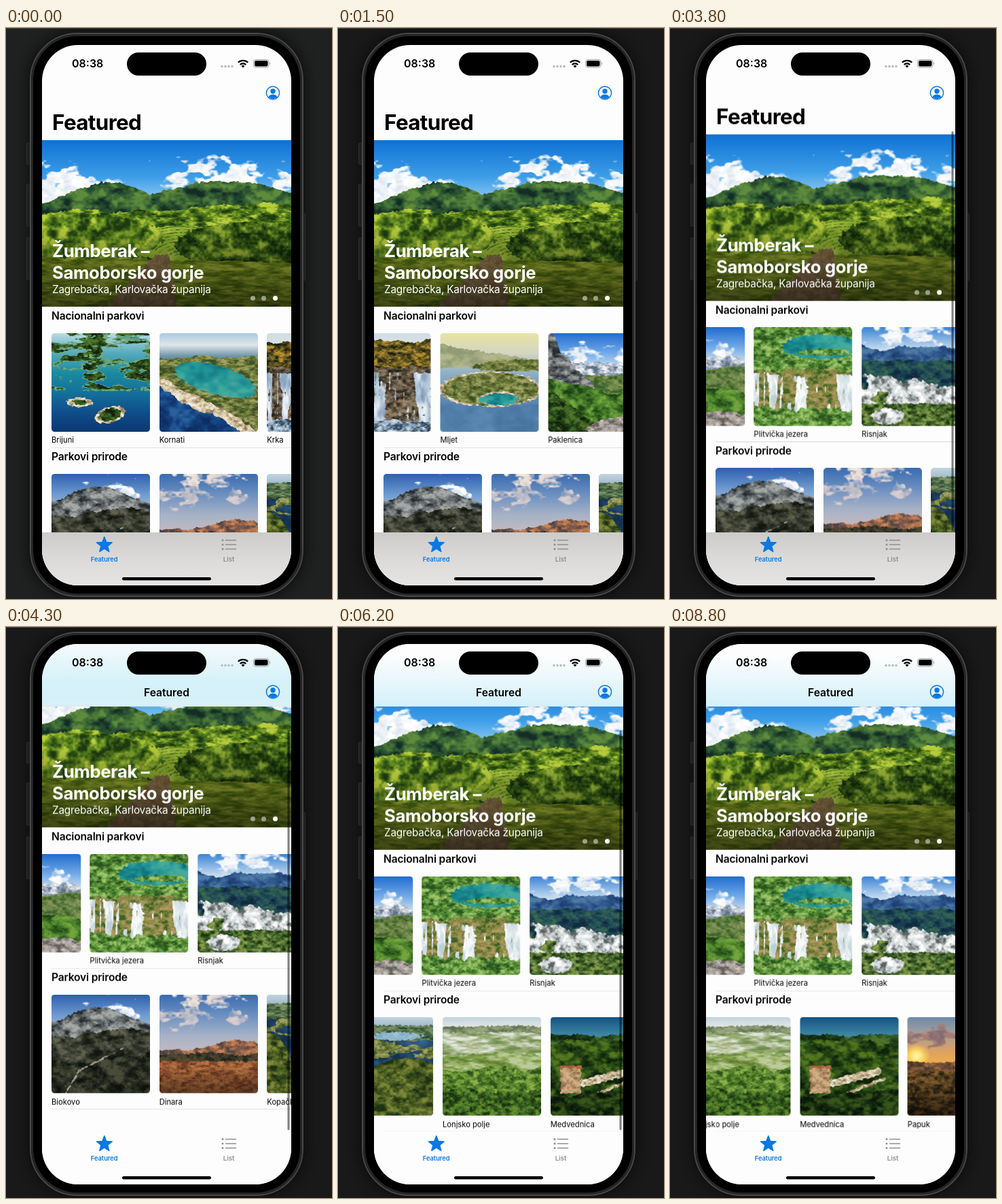
An HTML page with a canvas for the animation above (9.3 s loop, 480x840 px).

```html
<!DOCTYPE html>
<html lang="hr">
<head>
<meta charset="utf-8">
<title>Parkovi</title>
<style>
  html, body { margin: 0; width: 100%; height: 100%; overflow: hidden; background: #191919; }
  #stage { position: relative; width: 480px; height: 840px; overflow: hidden; font-family: Inter, sans-serif; color: #000; }
  #stage * { box-sizing: border-box; }
  #stage div, canvas, svg { position: absolute; }
  canvas { left: 0; top: 0; }
  .edge { left: 0; top: 0; width: 480px; height: 1px; background: #4b483d; }
  .button { left: 30px; width: 6px; height: 63px; background: #303030; border: 1px solid #414141; border-radius: 2px; }
  .phone { left: 35px; top: 7px; width: 403px; height: 830px; border-radius: 70px; background: #000;
    border: 2px solid #484848; box-shadow: inset 0 0 0 3px #252525, 0 0 20px #0a0a0a; }
  .screen { left: 53px; top: 25px; width: 367px; height: 795px; border-radius: 53px; overflow: hidden; background: #fdfdfd; }
  #page { inset: 0; }
  #page div { white-space: nowrap; }
  #large { left: 15px; top: 93.5px; font: 700 31.4px/40px Inter, sans-serif; letter-spacing: -.02em; }
  #hero { left: 0; top: 139.5px; width: 367px; height: 244.5px; color: #fff; }
  .name { left: 15px; top: 147.5px; font: 700 25.7px/32px Inter, sans-serif; letter-spacing: -.014em; }
  .county { left: 15px; top: 210.5px; font: 400 15.4px/20px Inter, sans-serif; letter-spacing: -.016em; }
  .dot { top: 229px; width: 7.4px; height: 7.4px; border-radius: 50%; background: #fff; }
  .section { left: 0; width: 367px; height: 208px; }
  .heading { left: 14px; top: 0; font: 600 15.6px/20px Inter, sans-serif; letter-spacing: -.012em; }
  .row { left: 14px; top: 35px; }
  .row canvas { border-radius: 4.5px; }
  .label { top: 149.5px; font: 400 11.2px/16px Inter, sans-serif; }
  .rule { left: 14px; right: 0; top: 203px; height: 1px; background: #e2e2e3; }
  #nav { left: 0; top: 0; width: 367px; height: 91.5px; overflow: hidden; border-bottom: 1px solid #0000001a; background: #fdfdfd; }
  #haze { left: 0; top: 100px; width: 367px; height: 160px; background: linear-gradient(#fdfdfd, #d5f1fa 45%, #deeff2); }
  .tabs { left: 0; top: 717px; width: 367px; height: 78px; background: #fdfdfd; }
  #frost { inset: 0; background: linear-gradient(#cccbca, #dcdad8 50%, #e5e4e2); }
  svg { left: 0; top: 0; }
  svg text { font-family: Inter, sans-serif; font-weight: 600; }
</style>
</head>
<body>
<div id="stage">
  <div class="edge"></div>
  <div class="button" style="top:169px;height:32px"></div>
  <div class="button" style="top:229px"></div>
  <div class="button" style="top:308px"></div>
  <div class="button" style="left:435px;top:272px;height:100px"></div>
  <div class="phone"></div>
  <div class="screen">
    <div id="page">
      <div id="large">Featured</div>
      <div id="hero">
        <div class="name">Žumberak –<br>Samoborsko gorje</div>
        <div class="county">Zagrebačka, Karlovačka županija</div>
        <div class="dot" style="left:307px;opacity:.5"></div>
        <div class="dot" style="left:323px;opacity:.5"></div>
        <div class="dot" style="left:340px"></div>
      </div>
    </div>
    <div id="nav"><div id="haze"></div></div>
    <div class="tabs"><div id="frost"></div></div>
  </div>
  <svg width="480" height="840">
    <rect x="178" y="36" width="117" height="34" rx="17"/>
    <text x="97" y="58" font-size="16">08:38</text>
    <path d="M318 56.5h17" stroke="#bbb" stroke-width="3.6" stroke-linecap="round" stroke-dasharray="0 5"/>
    <g fill="none" stroke="#000" stroke-width="2.3">
      <path d="M341.8 50.8a10.2 10.2 0 0 1 14.4 0M344.7 54a6.1 6.1 0 0 1 8.6 0"/>
      <path d="M349 58.6l-2.5-2.7a3.6 3.6 0 0 1 5 0z" fill="#000" stroke="none"/>
    </g>
    <rect x="364.5" y="46.5" width="22.5" height="11.5" rx="3.5" fill="none" stroke="#999"/>
    <rect x="366" y="48" width="19.5" height="8.5" rx="2.2"/>
    <path d="M388.5 50.3q2 2 0 4z" fill="#999"/>
    <g fill="#0b78e3">
      <circle cx="393" cy="95.5" r="9.6" fill="none" stroke="#0b78e3" stroke-width="1.5"/>
      <circle cx="393" cy="93" r="3.7"/>
      <path d="M386.4 101.6q1.4-3.8 6.6-3.8t6.6 3.8q-2.8 2.6-6.6 2.6t-6.6-2.6z"/>
      <path id="star" stroke="#0b78e3" stroke-width="1.4" stroke-linejoin="round"/>
      <text x="144.7" y="784.5" font-size="9.3" text-anchor="middle">Featured</text>
    </g>
    <g fill="#8e8e90" stroke="#8e8e90">
      <path d="M323.5 753.5h15M323.5 760h15M323.5 766.5h15" stroke-width="1.5" stroke-linecap="round"/>
      <path d="M319 753.5h0M319 760h0M319 766.5h0" stroke-width="3" stroke-linecap="round"/>
      <text x="328" y="784.5" font-size="9.6" text-anchor="middle" stroke="none">List</text>
    </g>
    <rect x="171" y="808" width="131" height="4.6" rx="2.3"/>
    <text id="title" x="236.5" y="101.5" font-size="15.6" text-anchor="middle">Featured</text>
    <rect id="bar" x="414.5" y="152" width="3" height="588" rx="1.5" fill-opacity=".5"/>
  </svg>
</div>
<script>
const LOOP = 9300, STEP = 100, CARD = 145, PITCH = 158.67;
const $ = id => document.getElementById(id);
const clamp = v => Math.min(1, Math.max(0, v));

// seeded value noise
let seed = 4711;
const rand = () => (seed = seed * 16807 % 2147483647) / 2147483647;
const grid = Float32Array.from({ length: 65536 }, rand);
const cell = (i, j) => grid[(j & 255) << 8 | i & 255];
const mix = (a, b, t) => a + (b - a) * t;
const smooth = t => t * t * (3 - 2 * t);

function noise(x, y) {
  const i = Math.floor(x), j = Math.floor(y), u = smooth(x - i), v = smooth(y - j);
  return mix(mix(cell(i, j), cell(i + 1, j), u), mix(cell(i, j + 1), cell(i + 1, j + 1), u), v);
}
const fbm = (x, y) => .5 * noise(x, y) + .3 * noise(2.1 * x, 2.1 * y + 7) + .2 * noise(4.3 * x, 4.3 * y + 19);

// shapes: functions of (x, y), positive inside, roughly in pixels
const below = (top, slope = 0, amp = 5, wave = 30) => (x, y) => y - top - slope * x - amp * (2 * fbm(x / wave, top) - 1);
const hump = (cx, top, width, height) => (x, y) => y - top - height * (1 - Math.exp(-(((x - cx) / width) ** 2))) - 6 * fbm(x / 14, top) + 3;
const oval = (cx, cy, rx, ry, tilt = 0) => (x, y) =>
  (1 - Math.hypot((x - cx) / rx, (y - cy - tilt * (x - cx)) / ry)) * Math.min(rx, ry);
const box = (x0, y0, x1, y1) => (x, y) => Math.min(x - x0, x1 - x, y - y0, y1 - y);
const strip = (x0, y0, x1, y1, width) => (x, y) => {
  const dx = x1 - x0, dy = y1 - y0, t = clamp(((x - x0) * dx + (y - y0) * dy) / (dx * dx + dy * dy));
  return width / 2 - Math.hypot(x - x0 - t * dx, y - y0 - t * dy);
};
const both = (a, b) => (x, y) => Math.min(a(x, y), b(x, y));
const either = (a, b) => (x, y) => Math.max(a(x, y), b(x, y));
const grow = (a, d) => (x, y) => a(x, y) + d;
const above = bottom => (x, y) => bottom - y;
const band = (top, bottom, slope) => both(below(top, slope), above(bottom));
const patches = (cut, wide, high) => (x, y) => (fbm(x / wide, y / high) - cut) * 3 * high;
const streaks = area => both(area, (x, y) => (noise(x / 3, y / 30) + noise(x / 13, 3) - 1) * 14);
const rings = (cx, cy) => (x, y) => (Math.sin(Math.hypot(x - cx, 1.9 * (y - cy)) * .75) - .7) * 2;

const FOREST = ['#0f200c', '#2a4a1b', '#4f7629'];
const SPRING = ['#28531f', '#578f36', '#a0c56c'];
const SUNLIT = ['#1d3a11', '#567f1d', '#b9ce3c'];
const OLIVE = ['#3c4f22', '#6d7b3a', '#a6a468'];
const ROCK = ['#252b2e', '#626869', '#a5a8a6'];
const SCREE = ['#12160f', '#35392d', '#626251'];
const CHALK = ['#59645f', '#ced3d5', '#ffffff'];
const SAND = ['#8f7b5b', '#cdbb96', '#f2eada'];
const EARTH = ['#29231c', '#5f5240', '#98866a'];
const SEA = ['#0c2d62', '#14427f', '#2a609f'];
const LAKE = ['#10717a', '#1f9296', '#45aa9c'];

function paint(w, h, scene) {
  const canvas = document.createElement('canvas');
  canvas.width = w;
  canvas.height = h;
  const c = canvas.getContext('2d'), image = c.createImageData(w, h), px = image.data.fill(255);
  let shift = 0;

  const ramp = colors => {
    const rgb = colors.map(s => [1, 3, 5].map(i => parseInt(s.slice(i, i + 2), 16)));
    return (t, k) => {
      const f = clamp(t) * (rgb.length - 1), i = Math.min(Math.floor(f), rgb.length - 2);
      return mix(rgb[i][k], rgb[i + 1][k], f - i);
    };
  };
  const blend = (colors, alpha, tone) => {
    const color = ramp(colors);
    for (let y = 0, o = 0; y < h; y++)
      for (let x = 0; x < w; x++, o += 4) {
        const a = alpha(x, y);
        if (a <= 0) continue;
        const t = tone(x, y);
        for (let k = 0; k < 3; k++) px[o + k] = mix(px[o + k], color(t, k), a);
      }
  };
  scene({
    sky: (colors, bottom) => blend(colors, () => 1, (x, y) => y / bottom),
    cloud: (area, colors = ['#cfdcea', '#ffffff']) =>
      blend(colors, (x, y) => clamp((area(x, y) + 60 * (fbm(x / 22, y / 13) - .58)) * .13), (x, y) => fbm(x / 12, y / 9) * 1.5),
    glow: (color, area) => blend([color, color], (x, y) => clamp(area(x, y) * .1), () => 0),
    layer(colors, area, grain = 7, squash = 1.4) {
      shift += 17;
      const s = shift;
      blend(colors, (x, y) => clamp(.5 + area(x, y) + 3 * noise(x / 3, y / 3 + s) - 1.5),
        (x, y) => (fbm(x / grain + s, y * squash / grain) - .26) / .46);
    },
    shade: (from, strength) => blend(['#000000', '#000000'], (x, y) => strength * clamp((y - from) / (h - from)), () => 0)
  });
  c.putImageData(image, 0, 0);
  return canvas;
}

function meadow({ sky, cloud, layer, shade }) {
  sky(['#0f72d3', '#3f9fe8', '#c8e6f6'], 110);
  cloud(oval(15, 75, 100, 36));
  cloud(oval(275, 55, 120, 24));
  layer(['#132c25', '#2f5932', '#5f8b3c'], either(hump(97, 62, 85, 42), hump(268, 60, 125, 34)), 18);
  layer(SUNLIT, below(106, -.04, 8, 50), 13, 2);
  layer(['#83a42c', '#a9c443'], oval(205, 152, 80, 26), 30);
  layer(['#4e6f1b', '#64851f'], both(rings(205, 172), oval(205, 148, 52, 22)));
  layer(SUNLIT, oval(45, 142, 135, 34), 15, 1.1);
  layer(['#142a0b', '#426618', '#93ae34'], oval(310, 154, 115, 34), 13, 1.1);
  layer(['#4d6610', '#728a1f', '#a0ae36'], below(172, .02, 3, 60), 18, 4);
  layer(['#77603a', '#9a805a'], both(below(168), (x, y) => (y - 150) * .55 - Math.abs(x - 178 + (y - 165) * .4)), 9);
  shade(122, .6);
}

const parks = {
  Brijuni({ sky, layer }) {
    sky(['#b9dbe2', '#55aabc', '#1b8a9f', '#14709b', '#0f4d8c', '#0b3870'], CARD);
    const isles = both(patches(.58, 30, 9), above(82));
    const near = either(oval(41, 101, 15, 6), oval(86, 119, 20, 11, -.2));
    layer(['#4f9a84', '#7fae7c'], grow(isles, 2));
    layer(FOREST, isles);
    layer(SAND, grow(near, 1));
    layer(FOREST, grow(near, -2));
  },
  Kornati({ sky, layer }) {
    sky(['#aac9e2', '#dfe7e6', '#6f94aa', '#4f7c9d'], 50);
    layer(OLIVE, below(34), 8, 2);
    layer(LAKE, oval(82, 68, 60, 22, .25), 30);
    layer(SAND, below(62, .55, 9));
    layer(SEA, below(79, .55, 12), 20);
  },
  Krka({ sky, layer }) {
    sky(['#cfdce4', '#e6e9e5'], 30);
    layer(['#1d2110', '#5c5120', '#b88f2e'], below(12, 0, 9));
    layer(EARTH, below(50));
    layer(['#8aa5c0', '#e8f0f6'], streaks(box(-9, 58, CARD, 135)), 9, .4);
    layer(['#30475c', '#8fa8bd', '#dde7ee'], below(128));
  },
  Mljet({ sky, layer }) {
    sky(['#e8e2a4', '#d3d6c2', '#8fb0c4', '#6a92b6', '#4b79ab', '#3a669d'], CARD);
    layer(['#8f9b74', '#b4b78c'], band(16, 50, .15), 12);
    layer(OLIVE, both(oval(115, 49, 62, 11), above(55)));
    const isle = oval(74, 82, 70, 24);
    layer(SAND, grow(isle, 2));
    layer(OLIVE, isle);
    layer(SAND, oval(86, 96, 30, 11));
    layer(LAKE, oval(86, 97, 27, 9), 20);
    layer(['#46749f', '#5b88b2'], below(107, 0, 6), 30);
  },
  Paklenica({ sky, cloud, layer }) {
    sky(['#246dd0', '#6da7e6', '#d8e9f5'], 55);
    cloud(oval(75, 34, 60, 14));
    layer(['#5d6f86', '#a7b3c2', '#f2f5f8'], below(46, 0, 9));
    layer(['#3a5c2b', '#61803f', '#8e9b62'], below(65, -.05));
    layer(ROCK, below(0, 1.15, 14, 20), 9);
    layer(['#1c4014', '#437a28', '#74a53d'], below(66, .22, 8), 12);
    layer(FOREST, below(82, .7));
    layer(['#625e5b', '#a19b94', '#cdc6be'], oval(108, 143, 52, 20));
  },
  'Plitvička jezera'({ layer }) {
    layer(SPRING, below(-20));
    layer(LAKE, oval(100, 28, 58, 18), 20);
    layer(SPRING, both(oval(105, 36, 42, 5), below(20)));
    layer(SPRING, below(48, 0, 8));
    layer(['#3c5f23', '#7f8540', '#b59a63'], below(62, 0, 8));
    layer(['#bccfd6', '#ffffff'], streaks(band(68, 126, 0)), 6, .3);
    layer(SPRING, below(116, 0, 14));
  },
  Risnjak({ sky, cloud, layer }) {
    sky(['#3d85d6', '#d0e3f2'], 34);
    cloud(oval(80, 10, 95, 14));
    layer(['#1d3d70', '#2f588d', '#4f7aa6'], below(29, 0, 7), 12);
    layer(['#10293f', '#204a58', '#3c6b4c'], below(48), 10);
    layer(['#1b3413', '#47692c', '#8a9f50'], below(86));
    layer(CHALK, both(below(66, .16, 10, 20), both(patches(.4, 30, 20), above(112))), 8, 1);
    layer(CHALK, oval(38, 130, 24, 12), 8, 1);
  }
};

const nature = {
  Biokovo({ sky, cloud, layer }) {
    sky(['#2e60ae', '#6f9bd0', '#b4c9de'], 60);
    cloud(oval(108, 24, 40, 15));
    layer(ROCK, hump(68, 17, 55, 30), 11);
    layer(SCREE, below(62, -.1, 10), 13);
    layer(['#0d120c', '#292d22', '#4a4b3a'], below(108, -.15, 9), 11);
    layer(['#8a897d', '#a5a396'], either(strip(40, 112, 105, 78, 2), strip(40, 112, 20, 145, 2)));
  },
  Dinara({ sky, cloud, layer, shade }) {
    sky(['#3b6cb0', '#6c90c0', '#a7b2c6', '#c9bcc0'], 90);
    cloud(oval(75, 8, 60, 12), ['#c5bcc6', '#f4e8dc']);
    cloud(oval(70, 34, 85, 12), ['#9da7bd', '#dccfce']);
    layer(['#4c4345', '#90614a', '#cd8554'], hump(115, 66, 40, 15), 9);
    layer(['#191f17', '#39382a', '#554a33'], below(86));
    layer(['#663a22', '#9c5935', '#b97a44'], below(97, 0, 2), 7, 2);
    shade(105, .45);
  },
  'Kopački rit'({ sky, layer }) {
    sky(['#c0d4e0', '#a2bac9'], 14);
    layer(['#2b452c', '#51704a', '#84976a'], below(12, 0, 2), 8, 3);
    layer(['#7fa9c2', '#a3c5d8'], oval(90, 28, 38, 6));
    layer(['#14304c', '#234a70', '#37648d'], below(34, 0, 3), 25);
    layer(OLIVE, both(patches(.5, 35, 10), band(35, 60, 0)));
    layer(['#1d3012', '#46591f', '#7d8839'], either(oval(105, 112, 72, 52), oval(0, 118, 38, 62)), 10);
  },
  'Lonjsko polje'({ sky, layer }) {
    sky(['#c3d4de', '#e6e9e4'], 15);
    layer(['#5f7350', '#9aa781'], below(13, 0, 2));
    layer(['#6f8b4e', '#a7b886', '#e2e6e0'], below(22, 0, 2), 20, 4);
    layer(['#5e7f34', '#89a651', '#bccb9a'], below(54), 15, 3);
    layer(['#2b5017', '#55812b', '#8cb14b'], below(76, 0, 7), 6);
    layer(['#17300d', '#3a6120', '#62902f'], below(106, 0, 9), 6);
  },
  Medvednica({ sky, layer }) {
    sky(['#155382', '#3d85a4', '#86b0b6'], 50);
    layer(['#12280f', '#2c5020', '#4c7430'], below(27, 0, 6), 14);
    layer(['#0d200a', '#284a16', '#54781f'], below(38, 0, 9), 13);
    layer(SAND, strip(46, 97, 114, 80, 11), 5);
    layer(SAND, strip(42, 122, 124, 90, 4), 5);
    layer(['#8c6a49', '#b9936b', '#d3b48a'], box(14, 73, 44, 112), 5);
    layer(['#a5502f', '#bf6b45'], box(14, 71, 45, 75));
    layer(['#081408', '#1b3210', '#38561c'], below(118, -.08), 9);
  },
  Papuk({ sky, cloud, glow, layer, shade }) {
    sky(['#6f8aa9', '#a5a09e', '#dba066', '#f0b04c'], 72);
    cloud(oval(60, 30, 85, 13), ['#6d6270', '#a97f72']);
    glow('#ffdc62', oval(13, 57, 20, 18));
    glow('#fffbd0', oval(13, 57, 9, 9));
    layer(['#4b3628', '#76513a', '#a36a3a'], below(64));
    layer(['#241c10', '#523d20', '#8a632f'], below(80));
    shade(85, .6);
  }
};

function add(parent, className, text = '') {
  const el = document.createElement('div');
  el.className = className;
  el.textContent = text;
  parent.append(el);
  return el;
}

function section(top, heading, scenes) {
  const area = add($('page'), 'section');
  area.style.top = top + 'px';
  add(area, 'heading', heading);
  const row = add(area, 'row');
  Object.entries(scenes).forEach(([name, scene], i) => {
    const card = add(row, 'card');
    card.style.left = i * PITCH + 'px';
    card.append(paint(CARD, CARD, scene));
    add(card, 'label', name);
  });
  add(area, 'rule');
  return row;
}

function valueAt(stops, t, ease) {
  const i = stops.findIndex(stop => stop[0] >= t);
  if (i < 1) return stops.at(i)[1];
  const [[t0, a], [t1, b]] = stops.slice(i - 1, i + 1);
  return mix(a, b, ease((t - t0) / (t1 - t0)));
}

// holds each eased value for one STEP; stops are [ms, value]
function play(el, prop, stops, format = v => v, ease = t => t) {
  const frames = [];
  for (let t = 0; t <= LOOP; t += STEP)
    frames.push({ offset: t / LOOP, [prop]: format(valueAt(stops, t, ease)), easing: 'steps(1)' });
  el.animate(frames, { duration: LOOP, iterations: Infinity });
}

$('hero').prepend(paint(367, 245, meadow));
const parkRow = section(388.5, 'Nacionalni parkovi', parks);
const natureRow = section(596.3, 'Parkovi prirode', nature);
$('star').setAttribute('d', 'M' + Array.from({ length: 10 }, (_, i) => {
  const a = i * Math.PI / 5, r = i % 2 ? 5.2 : 12;
  return `${144.8 + r * Math.sin(a)} ${760.6 - r * Math.cos(a)}`;
}).join('L') + 'z');

const left = v => `translateX(${-v}px)`, up = v => `translateY(${-v}px)`;
const glide = t => 1 - (1 - t) ** 1.77;
const scroll = [[3700, 0], [4300, 115.3], [4400, 115.3], [5000, 82.3]];
play($('stage'), 'backgroundColor', [[0, 0], [100, 1]], v => v ? '#191919' : '#1e2120');
play(parkRow, 'transform', [[200, 0], [1500, 392.5], [2800, 677], [3100, 736.8]], left);
play(natureRow, 'transform', [[5200, 0], [7000, 510.5]], left, glide);
for (const id of ['page', 'haze']) play($(id), 'transform', scroll, up, smooth);
for (const id of ['nav', 'title']) play($(id), 'opacity', [[3800, 0], [4100, 1]]);
for (const id of ['large', 'frost']) play($(id), 'opacity', [[3800, 1], [4200, 0]]);
play($('bar'), 'opacity', [[3700, 0], [3800, 1], [8100, 1], [8800, 0]]);
</script>
</body>
</html>
```
